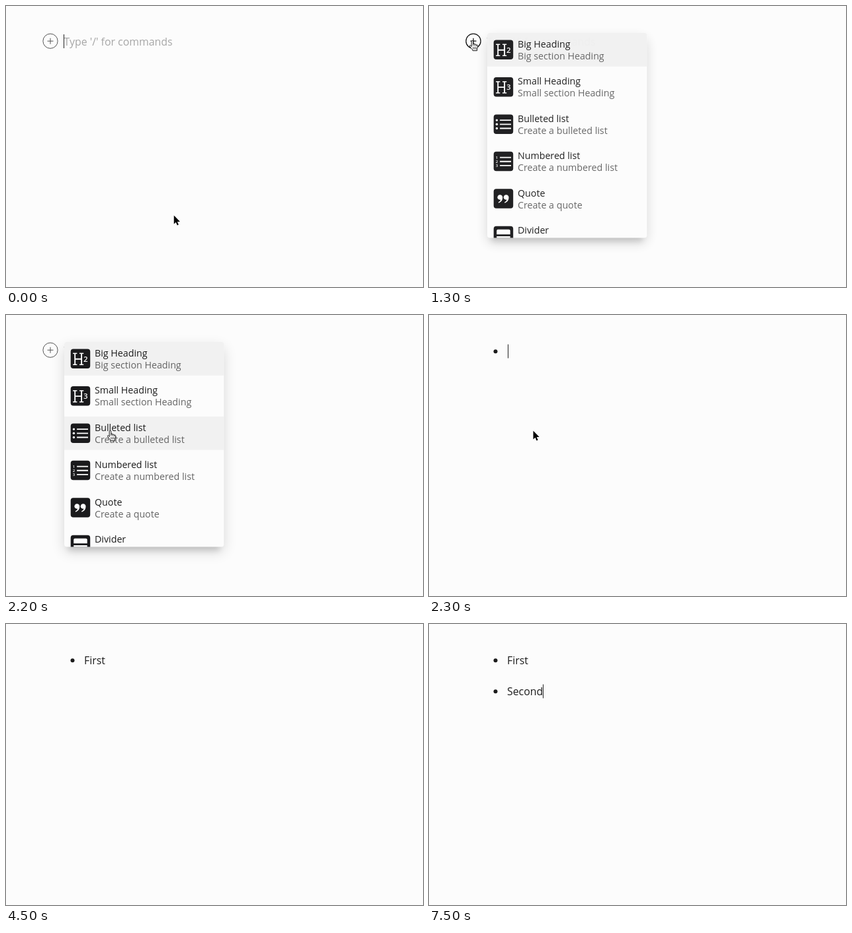
These frames come from a looping animation (630x426 px, 8000 ms). An HTML page:

```html
<!DOCTYPE html>
<html lang="en">
<head>
<meta charset="utf-8">
<title>Bulleted list from the block menu</title>
<style>
  html, body { margin: 0; width: 100%; height: 100%; overflow: hidden; background: #fcfcfc; }
  svg { display: block; width: 630px; height: 426px; font-family: "Open Sans", "Noto Sans", sans-serif; }
  .body { font-size: 15.85px; fill: #1c1c1c; }
  .item { font-size: 14.22px; fill: #1c1c1c; }
  .note { font-size: 14.22px; fill: #646464; }
  .white { fill: #fff; }
  .line { fill: none; stroke: #fff; }
</style>
</head>
<body>
<svg viewBox="0 0 630 426">
  <defs>
    <filter id="soft" x="-30%" y="-30%" width="160%" height="160%"><feGaussianBlur stdDeviation="10"/></filter>
    <filter id="tight" x="-30%" y="-30%" width="160%" height="160%"><feGaussianBlur stdDeviation="4.5"/></filter>
    <clipPath id="panel"><rect x="88" y="41" width="241.3" height="310.5" rx="4"/></clipPath>
  </defs>
  <rect width="630" height="426" fill="#fcfcfc"/>

  <g id="prompt">
    <g id="plus" fill="none">
      <circle cx="67" cy="53.2" r="11.1"/>
      <path d="M62.5 53.2h9M67 48.7v9"/>
    </g>
    <text class="body" x="87.5" y="59.6" style="fill:#a6a6a6">Type '/' for commands</text>
  </g>

  <g id="bullets">
    <circle id="dot1" cx="100.5" cy="55.3" r="3" fill="#1c1c1c"/>
    <circle id="dot2" cx="100.5" cy="102.3" r="3" fill="#1c1c1c"/>
    <text id="line1" class="body" x="118" y="61"></text>
    <text id="line2" class="body" x="118" y="108"></text>
  </g>
  <rect id="caret" width="1" height="21" fill="#222"/>

  <g id="menu">
    <rect x="88" y="49" width="241" height="310" rx="4" opacity=".15" filter="url(#soft)"/>
    <rect x="94" y="54" width="229" height="303" rx="4" opacity=".13" filter="url(#tight)"/>
    <rect x="88" y="41" width="241.3" height="310.5" rx="4" fill="#fcfcfc"/>
    <g id="items" clip-path="url(#panel)"></g>
  </g>

  <g id="arrow">
    <path d="M0 0V13L3 10.3 5 15 7.1 14.1 5.1 9.5H9.2Z" stroke="#fff" stroke-width="1.6" stroke-linejoin="round" paint-order="stroke"/>
  </g>
  <g id="hand" stroke="#111" stroke-linejoin="round" stroke-linecap="round">
    <path fill="#fff" d="M-1.3 8.6V1.3a1.3 1.3 0 0 1 2.6 0V5.6a1.2 1.2 0 0 1 2.4 .3v.4a1.2 1.2 0 0 1 2.3 .4v.4a1.1 1.1 0 0 1 2.1 .6Q8.3 10.6 7.1 12.6V15.2H.6L0 13.4Q-2.6 11.2 -4 8.6C-4.6 7.2 -3 6.4 -2.1 7.6Z"/>
    <path fill="none" stroke-width=".8" d="M1.3 10v2.8M3.5 10v2.8M5.6 10v2.8M1.3 5.6v2M3.7 6.3v1.5M6 7.1v1.2"/>
  </g>
</svg>

<script>
const $ = id => document.getElementById(id);
const LOOP = 8000, STEP = 100;
const ROW_TOP = 41, ROW_PITCH = 56.45, ROW_HEIGHT = 50.6;

// Icons are drawn on a 29.5px tile.
const heading = digit => `
  <path class="line" stroke-width="1.9" d="M6.5 6.5V24M16.4 6.5V24M6.5 15.2H16.4"/>
  <path class="line" stroke-width="1.5" d="M3.4 6.7H9.6M13.3 6.7H19.5M3.4 23.8H9.6M13.3 23.8H19.5"/>
  <text class="white" x="19.3" y="19.4" font-size="11.5" font-weight="600">${digit}</text>`;
const lines = '<path class="line" stroke-width="1.8" d="M9.4 8.7H26.3M9.4 14.9H26.3M9.4 21.1H26.3"/>';
const each = draw => [0, 1, 2].map(draw).join('');
const mark = x => `<path class="white" transform="translate(${x} 9)" d="M3.7 0a3.7 3.7 0 0 1 3.8 4C7.5 8.2 5.3 11 1.6 12.4L1 11.2C3.4 10 4.4 8.7 4.5 7.2A3.7 3.7 0 1 1 3.7 0Z"/>`;

const items = [
  ['Big Heading', 'Big section Heading', heading(2)],
  ['Small Heading', 'Small section Heading', heading(3)],
  ['Bulleted list', 'Create a bulleted list',
    lines + each(i => `<circle class="white" cx="4.7" cy="${8.7 + 6.2 * i}" r="1.7"/>`)],
  ['Numbered list', 'Create a numbered list',
    lines + each(i => `<text class="white" x="3" y="${10.8 + 6.2 * i}" font-size="6" font-weight="600">${i + 1}</text>`)],
  ['Quote', 'Create a quote', mark(6) + mark(15.3)],
  ['Divider', '', `<path class="white" d="M4.5 12.5V7a2 2 0 0 1 2-2H23a2 2 0 0 1 2 2V12.5Z"/>
    <rect class="white" x="4.5" y="15.3" width="20.5" height="3"/>`]
];

$('items').innerHTML = items.map(([title, note, icon], i) => `
  <g transform="translate(88 ${ROW_TOP + ROW_PITCH * i})">
    <rect class="row" width="241.3" height="${ROW_HEIGHT}" fill="#f1f1f1"/>
    <g transform="translate(9.7 10.5)"><rect width="29.5" height="29.5" rx="4" fill="#1a1a1c"/>${icon}</g>
    <text class="item" x="46" y="22">${title}</text>
    <text class="note" x="46" y="40">${note}</text>
  </g>`).join('');
const rows = document.querySelectorAll('.row');

const keys1 = [3200, 3500, 3700, 3900, 4000];
const keys2 = [5500, 5800, 6000, 6100, 6300, 6500];
const caretOff = [[100, 600], [1100, 2300], [2800, 3200], [4500, 4800], [5300, 5500], [7000, 7500]];

const within = (t, a, b) => t >= a && t < b;
const show = (id, on) => $(id).setAttribute('display', on ? 'inline' : 'none');
const typed = (word, keys, t) => word.slice(0, keys.filter(k => t >= k).length);
const ease = (t, a, b) => {
  const p = Math.min(1, Math.max(0, (t - a) / (b - a)));
  return (1 - Math.cos(Math.PI * p)) / 2;
};
const mix = (a, b, p) => a + (b - a) * p;

function pointerAt(t) {
  const away = ease(t, 1400, 2100), toPlus = ease(t, 0, 700);
  return t < 1400
    ? [mix(253.7, 65.5, toPlus), mix(317.5, 52.5, toPlus)]
    : [mix(65.5, 157.5, away), mix(52.5, 175.5, away)];
}

function drawPointer(t, menuOpen, editing) {
  const [x, y] = pointerAt(t);
  const onPlus = !editing && Math.hypot(x - 67, y - 53) < 12;
  const inMenu = menuOpen && x > 88;
  const pointing = onPlus || inMenu;
  const visible = t < 3200;
  for (const id of ['arrow', 'hand']) $(id).setAttribute('transform', `translate(${x} ${y})`);
  show('hand', visible && pointing);
  show('arrow', visible && !pointing);

  $('plus').setAttribute('stroke', onPlus ? '#111' : '#555');
  $('plus').setAttribute('stroke-width', onPlus ? 1.25 : 1);
  const hovered = inMenu ? Math.floor((y - ROW_TOP) / ROW_PITCH) : 0;
  rows.forEach((row, i) => row.setAttribute('opacity', i === 0 || i === hovered ? 1 : 0));
}

function drawCaret(t, editing) {
  const second = t >= 4800;
  const line = $(second ? 'line2' : 'line1');
  const width = line.textContent ? line.getComputedTextLength() : 0.6;
  $('caret').setAttribute('x', editing ? Math.round(118 + width) : 87);
  $('caret').setAttribute('y', !editing ? 43 : second ? 91.5 : 44.5);
  show('caret', !caretOff.some(([a, b]) => within(t, a, b)));
}

function render(time) {
  const t = Math.floor((time % LOOP) / STEP) * STEP;
  const menuOpen = within(t, 1200, 2300), editing = t >= 2300;
  show('prompt', !editing);
  show('bullets', editing);
  show('dot2', t >= 4800);
  show('menu', menuOpen);
  $('menu').setAttribute('opacity', t < 1300 ? 0.5 : t < 1400 ? 0.97 : 1);
  $('line1').textContent = typed('First', keys1, t);
  $('line2').textContent = typed('Second', keys2, t);
  drawPointer(t, menuOpen, editing);
  drawCaret(t, editing);
}

const start = performance.now();
function tick() {
  render(performance.now() - start);
  requestAnimationFrame(tick);
}
tick();
</script>
</body>
</html>
```
